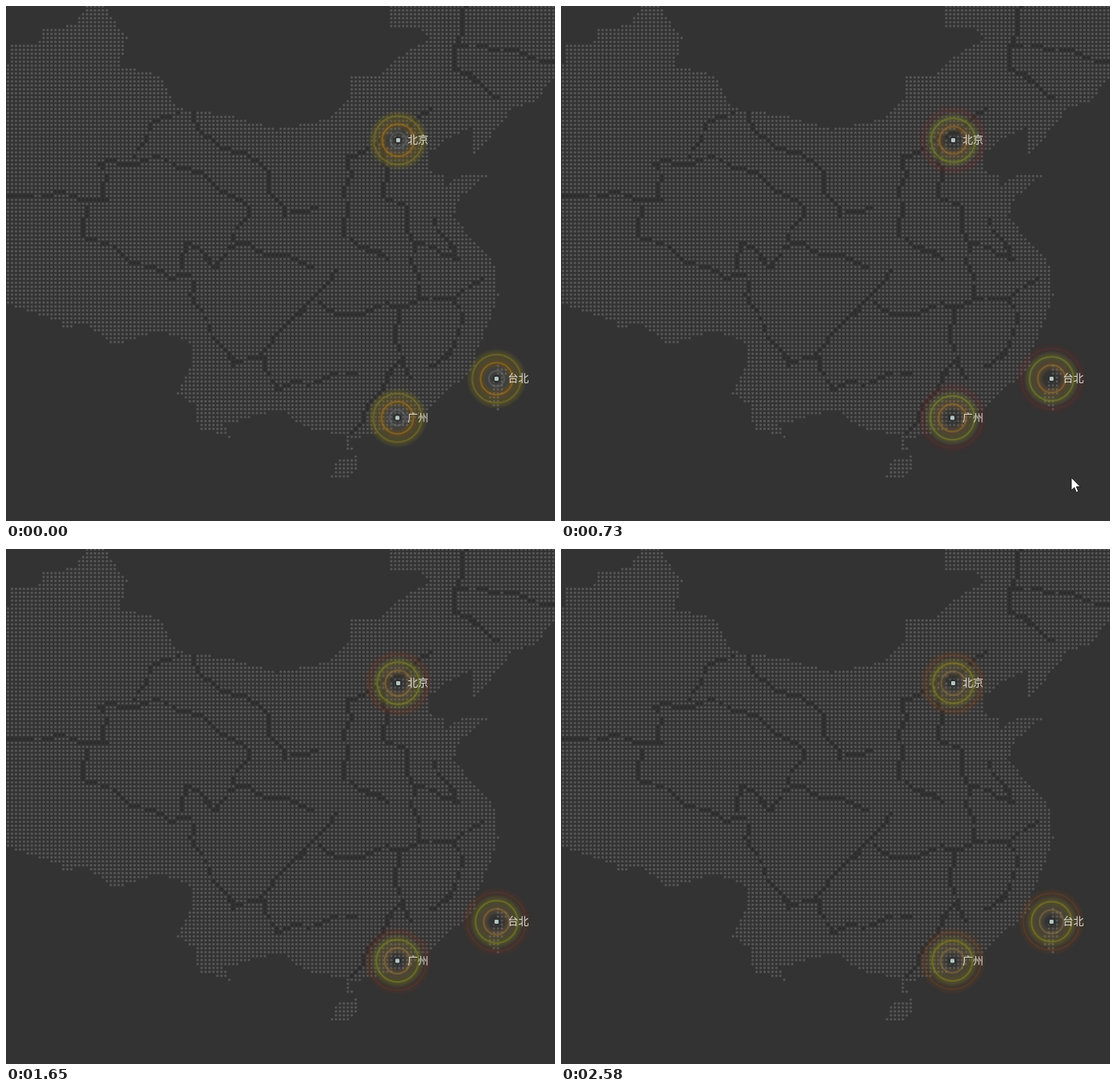
An HTML page with a canvas for the animation above (2.65 s loop, 681 px wide and 639 px high).

```html
<!DOCTYPE html>
<html lang="zh">
<head>
<meta charset="utf-8">
<title>Map pulses</title>
<style>
  html, body { margin: 0; width: 681px; height: 639px; overflow: hidden; background: #333; }
  body { position: relative; }
  canvas { position: absolute; left: 0; top: 0; }
  span {
    position: absolute; color: #deded6; white-space: nowrap;
    font: 500 13px/20px "Noto Sans CJK SC", "Noto Sans CJK", sans-serif;
  }
  #pointer { position: absolute; left: 0; top: 0; visibility: hidden; }
</style>
</head>
<body>
<canvas id="map" width="681" height="639"></canvas>
<canvas id="rings" width="681" height="639"></canvas>
<svg id="pointer" width="14" height="21" viewBox="-1 -1 14 21">
  <path d="M0 0V16L3.7 12.6L6.3 18.5L8.9 17.4L6.3 11.6H11.2Z" fill="#fff" stroke="#111" stroke-width=".9"/>
</svg>
<script>
const WIDTH = 681, HEIGHT = 639;
const LOOP = 2650;
const PITCH = 4.9;

// A few key points; the dot grid supplies the rough edges.
const land = new Path2D(`M0 92L5 48 40 47 46 27 84 24 100 0H122L150 40 141 73 190 86 212 126 285 138 335 153
  403 139 429 107 427 88 462 88 488 62 527 40 512 28 473 30 476 0H681V87L655 120 630 125 597 168 578 187
  580 150 545 165 522 186V205L545 208V222L565 210H597L562 238 555 262 605 318 611 360 585 428 580 450 540 485
  500 520 426 538 430 551H423L422 533 370 523 340 500 270 520 278 535 240 525 233 495 212 480 232 440 228 417
  190 402 135 421 95 392 72 404 68 392 0 370Z
  M608 445L622 450 611 504 598 488ZM410 562L438 558 435 575 420 588H402Z`);

const borders = new Path2D(`M0 238L65 234 125 242 118 197 200 190 285 235 302 260 272 300M160 187L180 150 218 128
  M97 245V285L200 335 225 330 238 380M235 133L240 160 318 195 345 262 388 245M220 325V293L262 322 285 295 410 330
  345 400 310 432M530 130L425 190 420 285 480 320M470 165V240L495 245 515 365M530 265L560 310 500 295
  M390 365L405 385 515 365 560 360 590 340M485 375V425L505 460M560 360L565 405 530 450M235 375L285 445 320 435
  335 475 445 450M490 440L425 533M570 0L553 75 615 115M562 50H600L681 70`);

const cities = [
  { name: "北京", x: 486.5, y: 166.5, labelX: 498 },
  { name: "台北", x: 608.5, y: 462.5, labelX: 622.5 },
  { name: "广州", x: 485.5, y: 511, labelX: 498 }
];

const grey = [122, 122, 116], orange = [165, 112, 28], green = [122, 134, 42], red = [135, 50, 32];
const tints = [grey, orange, green, red, red];

const mix = (a, b, k) => a.map((v, i) => v + (b[i] - v) * k);
const clamp = k => Math.min(1, Math.max(0, k));

function disc(ctx, x, y, r, color) {
  ctx.fillStyle = color;
  ctx.beginPath();
  ctx.arc(x, y, r, 0, 2 * Math.PI);
  ctx.fill();
}

function drawMap() {
  const ctx = document.getElementById("map").getContext("2d");
  ctx.lineWidth = 4.2;
  for (let y = .4; y < HEIGHT; y += PITCH)
    for (let x = 2.6; x < WIDTH; x += PITCH) {
      if (!ctx.isPointInPath(land, x, y)) continue;
      // Bend the borders so that they meander between the dots.
      const bx = x + 3 * Math.sin(y / 7), by = y + 3 * Math.sin(x / 9);
      const onBorder = ctx.isPointInStroke(borders, bx, by);
      disc(ctx, x, y, onBorder ? 1.9 : 1.6, onBorder ? "#2d2d2d" : "#555");
    }
}

function addLabels() {
  for (const c of cities) {
    const label = document.createElement("span");
    label.textContent = c.name;
    label.style.left = c.labelX + "px";
    label.style.top = Math.round(c.y - 11.5) + "px";
    document.body.append(label);
  }
}

const ctx = document.getElementById("rings").getContext("2d");
const pointer = document.getElementById("pointer");

// age runs from 0 to 1 over the life of a ring
function drawRing(c, age) {
  const stage = age / .3;
  const i = Math.floor(stage);
  const rgb = mix(tints[i], tints[i + 1], stage - i);
  const alpha = Math.min(.5 + age, .8, 2.4 * (1 - age));
  ctx.beginPath();
  ctx.arc(c.x, c.y, 9.7 + 30.6 * age, 0, 2 * Math.PI);
  for (let w = 14; w >= 2; w -= 3) {
    ctx.lineWidth = w;
    ctx.strokeStyle = `rgba(${rgb},${alpha * (w > 2 ? .12 : .7)})`;
    ctx.stroke();
  }
}

function drawPointer(step) {
  const shown = step >= 4 && step <= 16;
  pointer.style.visibility = shown ? "visible" : "hidden";
  const rest = mix([620, 633], [633, 585], clamp((step - 4) / 4));
  const [x, y] = mix(rest, [665, 622], clamp((step - 12) / 4));
  pointer.style.transform = `translate(${x - 1}px, ${y - 1}px)`;
}

function draw(step) {
  const phase = (step * .157) % 1;
  ctx.clearRect(0, 0, WIDTH, HEIGHT);
  for (const c of cities) {
    for (let i = 2; i >= 0; i--) drawRing(c, (phase + i) / 3);
    disc(ctx, c.x, c.y, 5, "#2e3030");
    ctx.fillStyle = "#b4c6c1";
    ctx.beginPath();
    ctx.roundRect(c.x - 2.5, c.y - 2.5, 5, 5, 1.2);
    ctx.fill();
  }
  drawPointer(step);
}

// The first steps run faster, then the pace is even.
function stepAt(t) {
  if (t < 70) return 0;
  if (t < 190) return 1 + Math.floor((t - 70) / 40);
  return 4 + Math.floor((t - 185) / 77);
}

let start = null;
let last = -1;
function tick(now) {
  if (start === null) start = now;
  const step = stepAt((now - start) % LOOP);
  if (step !== last) draw(last = step);
  requestAnimationFrame(tick);
}

drawMap();
addLabels();
draw(0);
requestAnimationFrame(tick);
</script>
</body>
</html>
```
